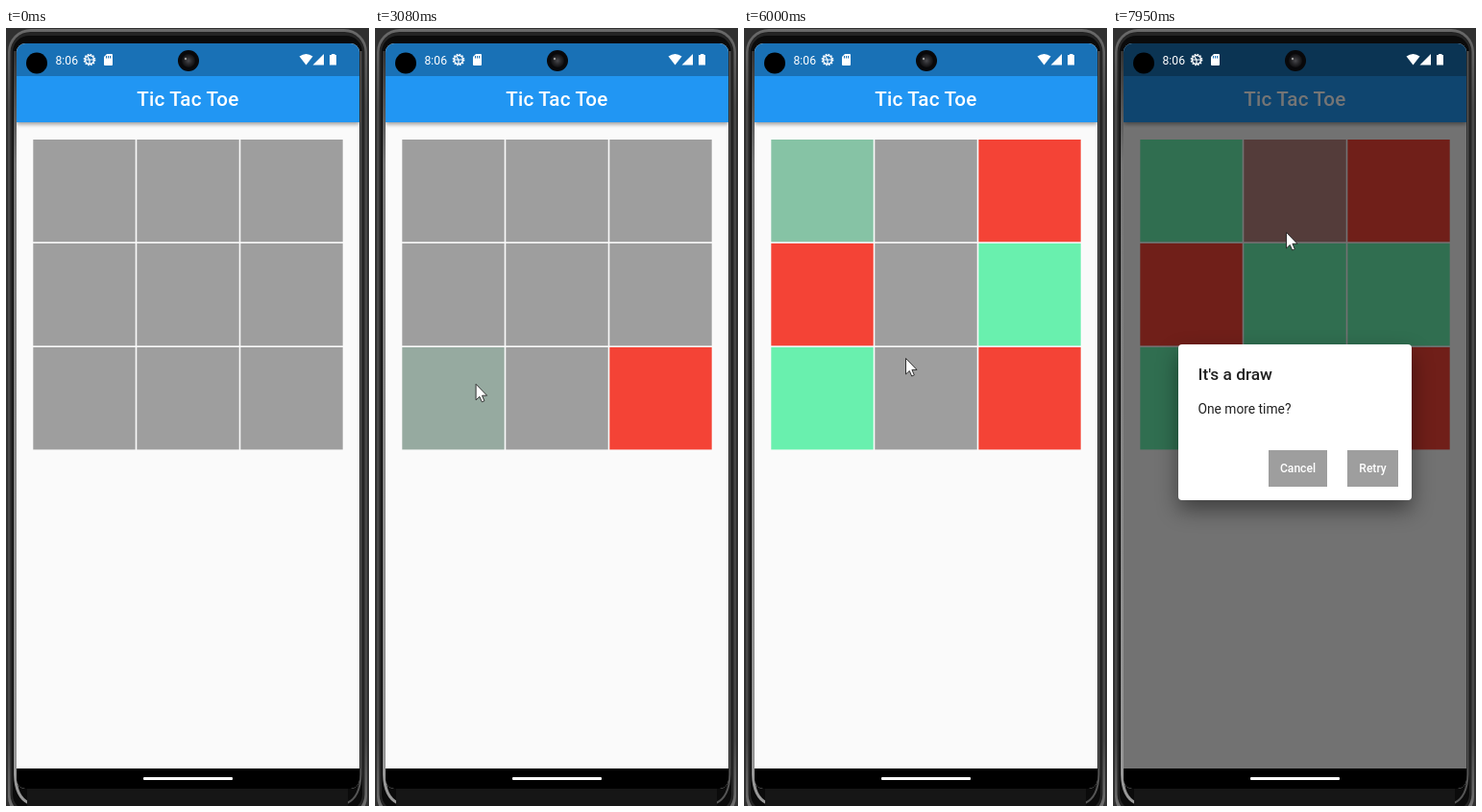
Animation, 378 px wide and 809 px high, one loop 8000 ms. Source, as an HTML page:

```html
<!DOCTYPE html>
<html lang="en">
<head>
<meta charset="utf-8">
<title>Tic Tac Toe</title>
<style>
  html, body { margin: 0; width: 100%; height: 100%; overflow: hidden; background: #303030; }
  svg { display: block; width: 378px; height: 809px; font-family: Roboto, sans-serif; }
  .medium { font-weight: 500; }
  .mid { text-anchor: middle; }
  #title { letter-spacing: .25px; }
  #bar { filter: drop-shadow(0 2px 2px rgba(0, 0, 0, .4)); }
  #card { filter: drop-shadow(0 10px 11px rgba(0, 0, 0, .45)); }
</style>
</head>
<body>
<svg viewBox="0 0 378 809">
  <defs>
    <linearGradient id="rim" x2="0" y2="1">
      <stop offset="0" stop-color="#6a6a6a"/>
      <stop offset=".1" stop-color="#484848"/>
      <stop offset=".9" stop-color="#484848"/>
      <stop offset="1" stop-color="#777"/>
    </linearGradient>
    <linearGradient id="streak" x2="0" y2="1">
      <stop offset="0" stop-color="#333"/>
      <stop offset=".15" stop-color="#777"/>
      <stop offset="1" stop-color="#999"/>
    </linearGradient>
    <radialGradient id="lens">
      <stop offset="0" stop-color="#4a4a4e"/>
      <stop offset=".5" stop-color="#29292c"/>
      <stop offset="1" stop-color="#101012"/>
    </radialGradient>
    <clipPath id="screen"><rect x="11" y="16" width="357" height="775" rx="9"/></clipPath>
  </defs>

  <!-- phone body -->
  <rect width="378" height="809" fill="#303030"/>
  <rect x="2" y="1" width="374" height="822" rx="24" fill="url(#rim)"/>
  <rect x="4.500" y="4" width="369" height="814" rx="21" fill="#242424"/>
  <rect x="7" y="8" width="364" height="806" rx="17" fill="#0b0b0b"/>
  <path d="M9.500 24V776Q10 800 24 806" fill="none" stroke="url(#streak)" stroke-width="3"/>
  <path d="M369.500 24V776Q369 800 355 806" fill="none" stroke="#555" stroke-width="2"/>
  <rect x="22" y="791" width="334" height="18" fill="#161616"/>

  <!-- app -->
  <g clip-path="url(#screen)">
    <rect x="11" y="16" width="357" height="775" fill="#fafafa"/>
    <rect id="bar" x="11" y="50" width="357" height="48" fill="#2196f3"/>
    <rect x="11" y="16" width="357" height="34" fill="#1971b6"/>
    <text id="title" class="medium mid" x="189.300" y="81" font-size="20.6" fill="#fff">Tic Tac Toe</text>
    <g id="board"></g>
    <rect id="shade" x="11" y="16" width="357" height="754"/>
    <rect x="11" y="770" width="357" height="21"/>
  </g>
  <rect x="143" y="779" width="93" height="3" rx="1" fill="#fff"/>

  <!-- status bar -->
  <circle cx="32" cy="36.500" r="11"/>
  <circle cx="190" cy="34" r="11" fill="#08080a"/>
  <circle cx="190" cy="34" r="7" fill="url(#lens)"/>
  <circle cx="187" cy="32" r="1.200" fill="#999"/>
  <g fill="#fff">
    <text x="51.500" y="38" font-size="12.2">8:06</text>
    <g fill="none" stroke="#fff">
      <circle cx="87" cy="33" r="4.500" stroke-width="1.5"/>
      <circle cx="87" cy="33" r="5.700" stroke-width="1.3" stroke-dasharray="1.6 1.38"/>
      <path d="M83 33H91M87 33V37.500M87 33L84.700 29.500" stroke-width="1.2"/>
    </g>
    <path d="M105 27H110Q111 27 111 28V38Q111 39 110 39H103Q102 39 102 38V30Z"/>
    <path d="M104.500 29V31.500M106.500 29V31.500M108.500 29V31.500" stroke="#1971b6"/>
    <path d="M305.500 29.500Q312.500 24.500 319.500 29.500L312.500 38.500Z"/>
    <path d="M331 27V38.500H319.500Z"/>
    <path d="M339 28V27H342.500V28H344V38.500H337V28Z"/>
  </g>

  <g id="dialog">
    <rect id="card" x="68" y="329" width="243" height="162" rx="4" fill="#fff"/>
    <text class="medium" x="88.500" y="366" font-size="17.3" fill="#212121">It's a draw</text>
    <text x="88.500" y="400.500" font-size="13.8" fill="#212121">One more time?</text>
    <path d="M162 439H223V477H162ZM244 439H297V477H244Z" fill="#9e9e9e"/>
    <g class="medium mid" font-size="12.1" fill="#fff">
      <text x="192.500" y="462">Cancel</text>
      <text x="270.500" y="462">Retry</text>
    </g>
  </g>

  <path id="cursor" d="M.5.5V17L4.300 13.500L6.700 19L9.300 17.900L6.900 12.400H12Z" fill="#fff" stroke="#222" stroke-width=".9"/>
</svg>
<script>
const LOOP = 8000, FADE = 1000, DIALOG_AT = 7690, DIALOG_FADE = 150;
const PITCH = 108, SIZE = 106.4;
const GREY = [158, 158, 158], RED = [244, 67, 54], GREEN = [105, 240, 174];

// where the pointer pauses: time, x, y and the cell it taps, if any
const stops = [
  [430, 322, 752], [1150, 278, 350],
  [1550, 312, 400, 8], [2930, 104, 383, 6], [3540, 108, 297, 3],
  [4110, 281, 265, 5], [4780, 276, 182, 2], [5550, 90, 197, 0],
  [6000, 168, 343], [6350, 171, 354, 7], [6950, 172, 275, 4],
  [7650, 183, 184, 1], [7950, 180, 212]];
const taps = stops.filter(stop => stop.length > 3);

const $ = id => document.getElementById(id);
const mix = (a, b, k) => a + (b - a) * k;
const ramp = (t, start, length) => Math.min(1, Math.max(0, (t - start) / length));
const smooth = k => k * k * (3 - 2 * k);

const cells = Array.from({ length: 9 }, (_, i) => {
  const cell = document.createElementNS('http://www.w3.org/2000/svg', 'rect');
  const attrs = { x: 28.3 + i % 3 * PITCH, y: 116 + Math.floor(i / 3) * PITCH, width: SIZE, height: SIZE };
  for (const name in attrs) cell.setAttribute(name, attrs[name]);
  return $('board').appendChild(cell);
});

function pointer(t) {
  const i = Math.max(0, stops.findLastIndex(stop => stop[0] <= t));
  const [t0, x0, y0] = stops[i], [t1, x1, y1] = stops[i + 1] || stops[i];
  const k = smooth(ramp(t, t0, t1 - t0 || 1));
  return [mix(x0, x1, k), mix(y0, y1, k)];
}

function draw(t) {
  // players alternate, red first
  taps.forEach(([start, , , cell], turn) => {
    const k = ramp(t, start, FADE), to = turn % 2 ? GREEN : RED;
    cells[cell].setAttribute('fill', `rgb(${GREY.map((c, i) => Math.round(mix(c, to[i], k)))})`);
  });
  const shown = ramp(t, DIALOG_AT, DIALOG_FADE);
  $('shade').setAttribute('opacity', shown * .54);
  $('dialog').setAttribute('opacity', shown);
  $('cursor').setAttribute('visibility', t < stops[0][0] ? 'hidden' : 'visible');
  $('cursor').setAttribute('transform', `translate(${pointer(t)})`);
}

const begin = performance.now();
function tick() {
  draw((performance.now() - begin) % LOOP);
  requestAnimationFrame(tick);
}
tick();
</script>
</body>
</html>
```
